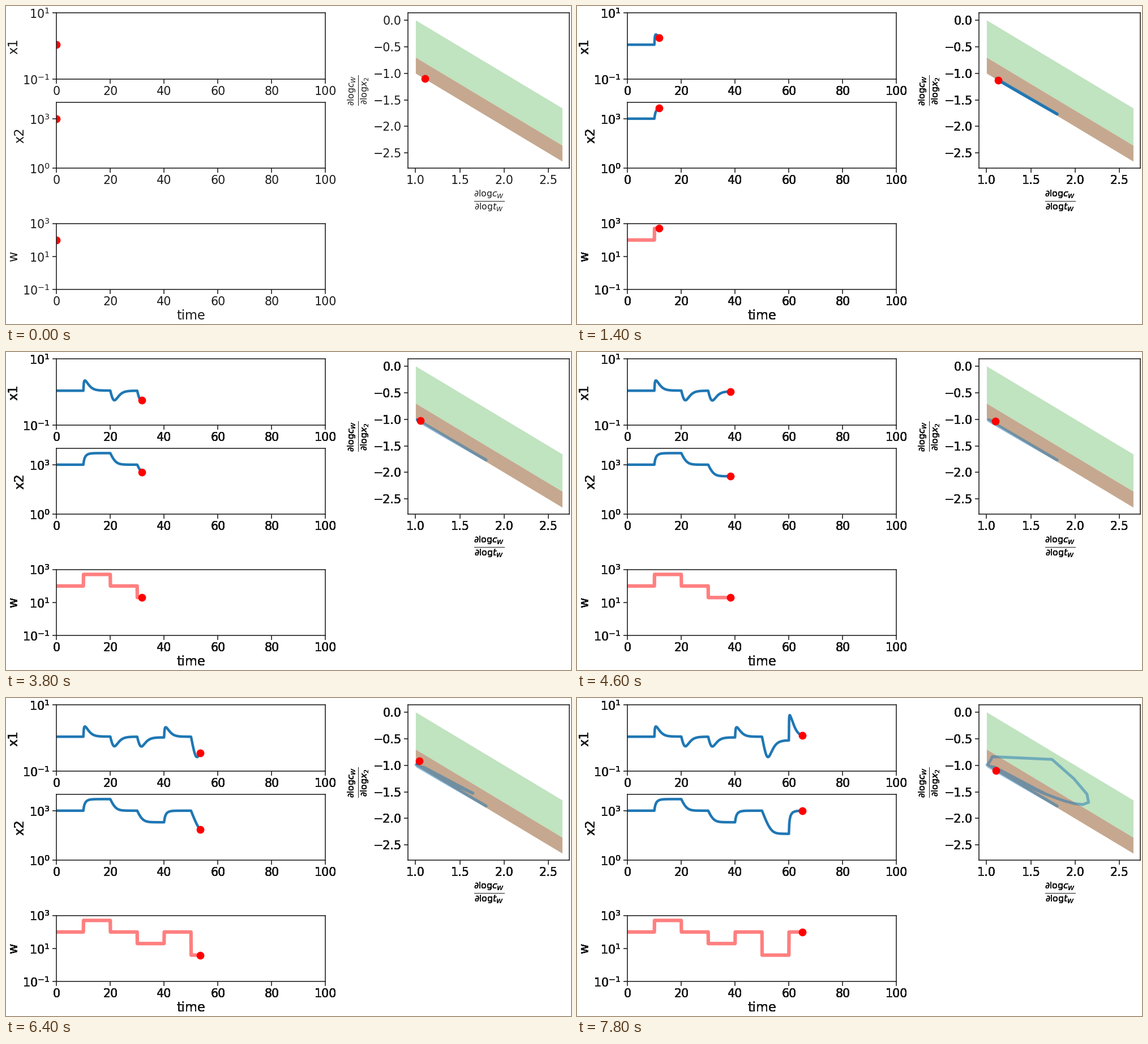
These frames come from a looping animation (998 by 561 pixels, 8 s). A matplotlib script:

```python
import numpy as np
import matplotlib.pyplot as plt
from matplotlib.animation import FuncAnimation
from matplotlib.artist import Artist

W, H, DPI = 998, 561, 90
FRAMES, INTERVAL = 40, 200
STEP = 100 / 60          # simulated time per frame
K = 10                   # binding constant
BLUE, INK = "#1f77b4", "0.1"
LEVELS = [100, 500, 100, 20, 100, 4, 100]

plt.rcParams.update({
    "font.family": "DejaVu Sans", "font.size": 16.5,
    "axes.labelsize": 18, "axes.labelpad": 3.2, "axes.linewidth": 1.25,
    "axes.edgecolor": INK, "axes.labelcolor": INK,
    "xtick.color": INK, "ytick.color": INK,
    "xtick.major.size": 6, "ytick.major.size": 6,
    "xtick.major.width": 1.25, "ytick.major.width": 1.25,
    "lines.solid_capstyle": "round",
})


def free_w(w, x2):
    """Free amount of w when it binds x2."""
    b = x2 - w + K
    return (np.sqrt(b * b + 4 * K * w) - b) / 2


def simulate():
    """Ten time units per input level: x2' = 10 w - x2, x1' = free_w - x1."""
    rows = []
    x1, start = free_w(100, 1000), 1000
    for i, w in enumerate(LEVELS):
        def x2_at(d):
            return 10 * w + (start - 10 * w) * np.exp(-d)

        prev = 0
        for d in 0.0228 + 0.02 * np.arange(499):
            decay = np.exp(prev - d)
            x1 = x1 * decay + free_w(w, x2_at((prev + d) / 2)) * (1 - decay)
            rows.append((10 * i + d, x1, x2_at(d), w))
            prev = d
        start = x2_at(10)
    rows.insert(0, (0, rows[0][1], 1000, 100))
    return np.array(rows).T


t, x1, x2, w = simulate()
c = free_w(w, x2)
slope = 2 * c + x2 - w + K
sens_w = w * (c + K) / (c * slope)
sens_x = -x2 / slope

fig = plt.figure(figsize=(W / DPI, H / DPI), dpi=DPI, facecolor="white")


def panel(left, top, right, bottom):
    return fig.add_axes([left / W, 1 - bottom / H,
                         (right - left) / W, (bottom - top) / H])


def dot(ax):
    return ax.plot([], [], "o", color="red", ms=10, zorder=2.4)[0]


def time_panel(top, bottom, name, ylim, ticks, **style):
    ax = panel(89.2, top, 564.4, bottom)
    ax.set_yscale("log")
    ax.set_xlim(0, 100)
    ax.set_ylim(*ylim)
    ax.set_xticks(range(0, 101, 20))
    ax.set_yticks(ticks)
    ax.set_yticks([], minor=True)
    ax.set_ylabel(name)
    line, = ax.plot([], [], **style)
    return ax, line, dot(ax)


blue = dict(color=BLUE, lw=3.6)
pink = dict(color="red", alpha=0.5, lw=5)
panels = [
    time_panel(12.3, 129, "x1", (0.1, 10), [0.1, 10], **blue),
    time_panel(169.6, 286.4, "x2", (1, 1e4), [1, 1e3], **blue),
    time_panel(383.6, 500.4, "w", (0.1, 1e3), [0.1, 10, 1e3], **pink),
]
panels[2][0].set_xlabel("time", labelpad=2)

phase = panel(710.4, 12.3, 995.4, 286.4)
edge = np.array([1, 2.655])
phase.fill_between(edge, 0.3 - edge, 1 - edge, color="#c0e3c0", lw=0)
phase.fill_between(edge, -edge, 0.3 - edge, color="#c5a88f", lw=0)
phase.set_xlim(0.917, 2.738)
phase.set_ylim(-2.788, 0.133)
phase.set_xticks([1, 1.5, 2, 2.5])
phase.set_yticks(np.arange(-2.5, 0.1, 0.5))
frac = r"$\frac{\partial \mathrm{log}c_W}{\partial \mathrm{log}%s}$"
phase.set_xlabel(frac % "t_W")
phase.set_ylabel(frac % "x_2")
trail, = phase.plot([], [], color=BLUE, lw=4, alpha=0.5)
recent, = phase.plot([], [], color=BLUE, lw=4)
phase_dot = dot(phase)


class Overprint(Artist):
    """Prints all labels again so that their soft edges grow heavier."""
    times = 0

    def draw(self, renderer):
        for ax in fig.axes:
            for axis in (ax.xaxis, ax.yaxis):
                for text in [axis.label, *axis.get_ticklabels()]:
                    for _ in range(self.times):
                        text.draw(renderer)


overprint = Overprint()
overprint.set_zorder(10)
fig.add_artist(overprint)


def update(frame):
    now = frame * STEP
    end = np.searchsorted(t, now + 1e-6)
    begin = np.searchsorted(t, now - STEP - 1e-6)
    for (_, line, mark), y in zip(panels, (x1, x2, w)):
        line.set_data(t[:end], y[:end])
        mark.set_data([now], [y[end - 1]])
    trail.set_data(sens_w[:end], sens_x[:end])
    recent.set_data(sens_w[begin:end], sens_x[begin:end])
    phase_dot.set_data([sens_w[end - 1]], [sens_x[end - 1]])
    overprint.times = min(frame, 7)
    return []


anim = FuncAnimation(fig, update, frames=FRAMES, interval=INTERVAL,
                     init_func=lambda: update(0), repeat=True, repeat_delay=0)
plt.show()
```
